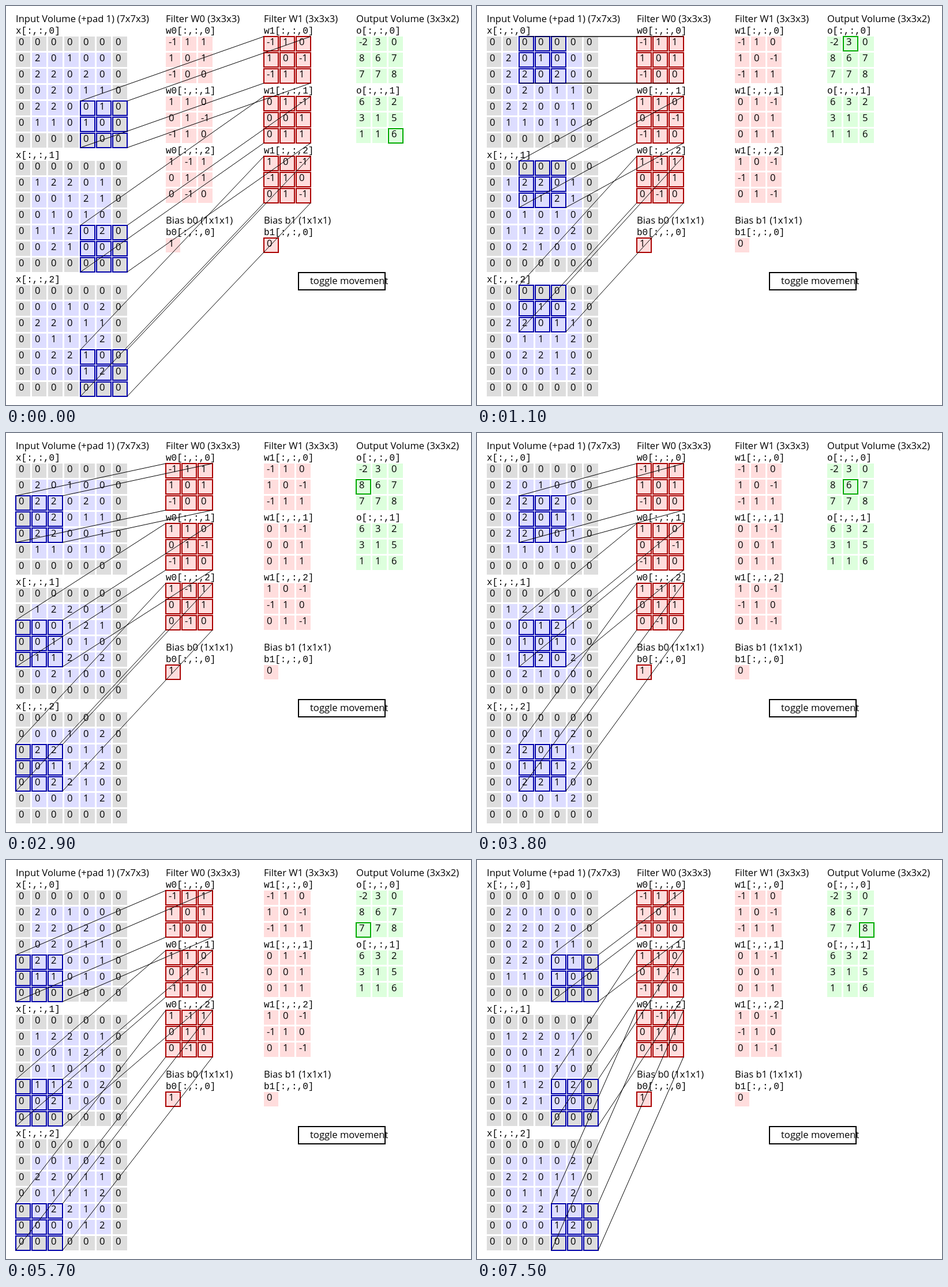
These frames come from a looping animation (806x693 px, 8 s). An HTML page:

```html
<!DOCTYPE html>
<html lang="en">
<head>
<meta charset="utf-8">
<title>Convolution demo</title>
<style>
  html, body { margin: 0; width: 100%; height: 100%; overflow: hidden; background: #fff; }
  svg { display: block; width: 806px; height: 693px; }
  text { font: 16.6px "Open Sans", "Noto Sans", sans-serif; white-space: pre; }
  .label { font: 16px "Liberation Mono", "Courier New", monospace; }
  .mark rect { fill: none; stroke-width: 2; }
  .mark line { stroke: #000; stroke-width: 1; }
</style>
</head>
<body>
<svg viewBox="0 0 806 693">
  <g id="base"></g>
  <g id="mark" class="mark"></g>
</svg>
<script>
const CELL = 25, PITCH = 28, SPAN = 2 * PITCH + CELL;
const LOOP = 8000;
const STARTS = [0, 200, 1100, 2000, 2900, 3800, 4800, 5700, 6600, 7500];
const BLUE = "#00a", RED = "#a00", GREEN = "#0a0";
const X_LEFT = 17, W_LEFT = [277, 447], O_LEFT = 607, B_TOP = 403;
const xTop = d => 53 + 216 * d;
const wTop = d => 53 + 104 * d;

const parse = s => s.split(" ").map(Number);
const rows = (list, n) => Array.from({ length: n }, (_, r) => list.slice(r * n, r * n + n));
const range = n => [...Array(n).keys()];

// Input volume: 5x5 layers surrounded by a ring of zeros
const input = [
  "20100 22020 02011 22001 11010",
  "12201 00121 01010 11202 02100",
  "00102 22011 01112 02210 00012"
].map(s => ["0000000", ...s.split(" ").map(r => `0${r}0`), "0000000"]
  .map(r => [...r].map(Number)));

const filters = [
  ["-1 1 1 1 0 1 -1 0 0", "1 1 0 0 1 -1 -1 1 0", "1 -1 1 0 1 1 0 -1 0"],
  ["-1 1 0 1 0 -1 -1 1 1", "0 1 -1 0 0 1 0 1 1", "1 0 -1 -1 1 0 0 1 -1"]
].map(f => f.map(s => rows(parse(s), 3)));
const bias = [1, 0];

function convolve(f, row, col) {
  let sum = bias[f];
  for (const d of range(3)) for (const r of range(3)) for (const c of range(3))
    sum += input[d][row * 2 + r][col * 2 + c] * filters[f][d][r][c];
  return sum;
}

function add(parent, name, attrs, content = "") {
  const el = document.createElementNS("http://www.w3.org/2000/svg", name);
  for (const key in attrs) el.setAttribute(key, attrs[key]);
  el.textContent = content;
  parent.appendChild(el);
}

const base = document.getElementById("base");
const mark = document.getElementById("mark");
const write = (x, y, s, cls = "") => add(base, "text", { x, y, class: cls }, s);

function grid(x, y, label, data, fill) {
  write(x, y - 5, label, "label");
  data.forEach((line, r) => line.forEach((v, c) => {
    const cx = x + c * PITCH, cy = y + r * PITCH;
    add(base, "rect", { x: cx, y: cy, width: CELL, height: CELL, fill: fill(r, c) });
    write(cx + 5, cy + 15, v);
  }));
}

function drawBase() {
  write(X_LEFT, 28, "Input Volume (+pad 1) (7x7x3)");
  const padded = (r, c) => r % 6 && c % 6 ? "#ddf" : "#ddd";
  input.forEach((layer, d) => grid(X_LEFT, xTop(d), `x[:,:,${d}]`, layer, padded));

  W_LEFT.forEach((x, f) => {
    const pink = () => "#fdd";
    write(x, 28, `Filter W${f} (3x3x3)`);
    filters[f].forEach((layer, d) => grid(x, wTop(d), `w${f}[:,:,${d}]`, layer, pink));
    write(x, B_TOP - 25, `Bias b${f} (1x1x1)`);
    grid(x, B_TOP, `b${f}[:,:,0]`, [[bias[f]]], pink);
  });

  write(O_LEFT, 28, "Output Volume (3x3x2)");
  for (const f of range(2)) {
    const result = range(3).map(r => range(3).map(c => convolve(f, r, c)));
    grid(O_LEFT, wTop(f), `o[:,:,${f}]`, result, () => "#dfd");
  }

  add(base, "rect", { x: 507, y: 463, width: 150, height: 30, fill: "none", stroke: "#000", "stroke-width": 2 });
  write(527, 483, "toggle movement");
}

function frameCells(x, y, n, stroke) {
  for (const r of range(n)) for (const c of range(n))
    add(mark, "rect", { x: x + c * PITCH, y: y + r * PITCH, width: CELL, height: CELL, stroke });
}

function drawStep(f, row, col) {
  mark.replaceChildren();
  const px = X_LEFT + col * 2 * PITCH, wx = W_LEFT[f];
  for (const d of range(3)) {
    frameCells(px, xTop(d) + row * 2 * PITCH, 3, BLUE);
    frameCells(wx, wTop(d), 3, RED);
  }
  frameCells(wx, B_TOP, 1, RED);
  frameCells(O_LEFT + col * PITCH, wTop(f) + row * PITCH, 1, GREEN);
  for (const d of range(3)) for (const dx of [0, SPAN]) for (const dy of [0, SPAN])
    add(mark, "line", {
      x1: px + dx, y1: xTop(d) + row * 2 * PITCH + dy,
      x2: wx + dx, y2: wTop(d) + dy
    });
}

let shown = -1;
function tick() {
  const t = performance.now() % LOOP;
  const step = STARTS.filter(s => s <= t).length - 1;
  if (step !== shown) {
    shown = step;
    // The loop opens on the last position of the second filter
    const pos = step ? step - 1 : 8;
    drawStep(step ? 0 : 1, Math.floor(pos / 3), pos % 3);
  }
  requestAnimationFrame(tick);
}

drawBase();
tick();
</script>
</body>
</html>
```
